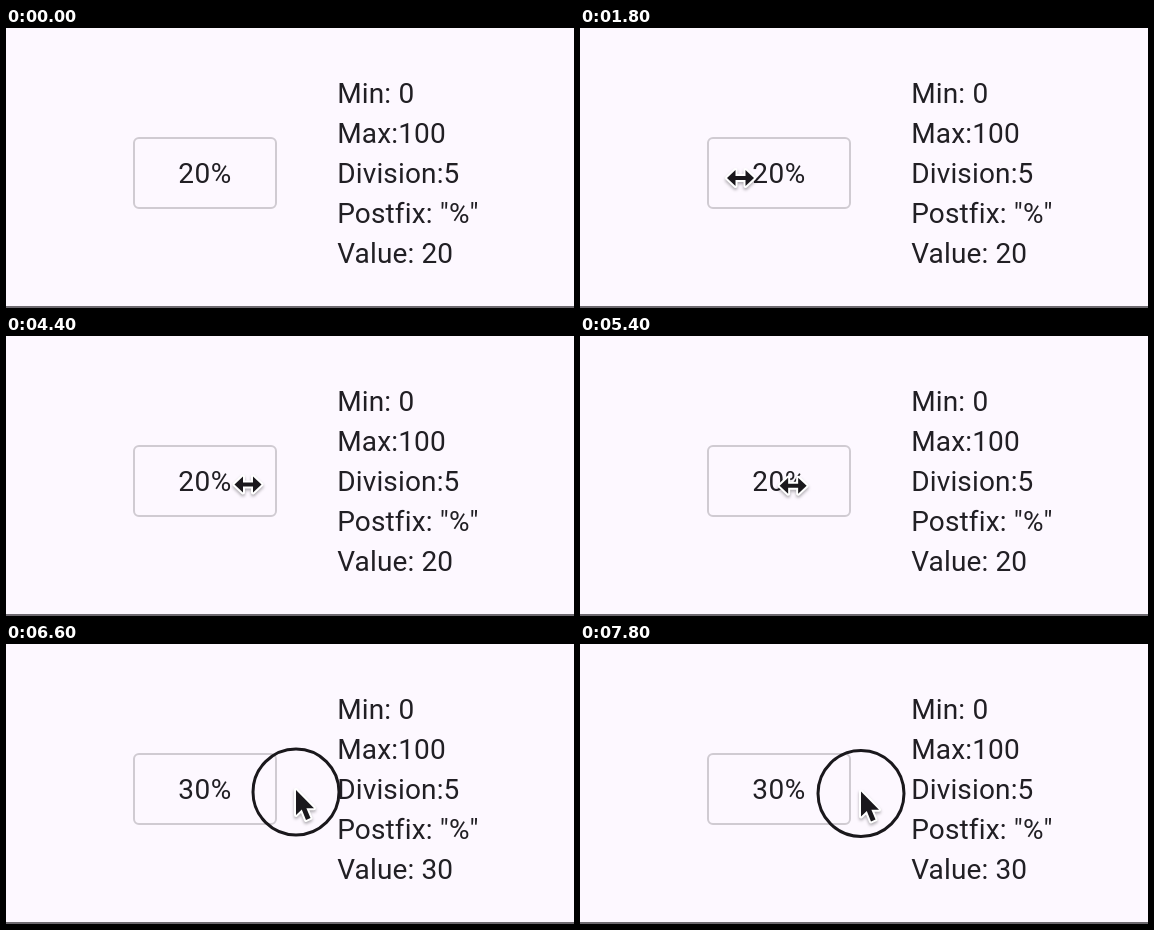
An HTML page that plays this animation: 568x280 px, repeating every 8000 ms.

```html
<!DOCTYPE html>
<html lang="en">
<head>
<meta charset="utf-8">
<title>Drag to change value</title>
<style>
  html, body { margin: 0; width: 100%; height: 100%; overflow: hidden; background: #fdf8ff; }
  svg { display: block; width: 568px; height: 280px; }
  text { font: 28px Roboto, sans-serif; letter-spacing: .5px; fill: #211f24; }
  .info text { letter-spacing: .15px; }
  .cursor path {
    fill: #1a181c; stroke: #fff; stroke-width: 4; stroke-linejoin: round; paint-order: stroke;
    filter: drop-shadow(0 2px 1.5px rgba(0, 0, 0, .3));
  }
</style>
</head>
<body>
<svg viewBox="0 0 568 280">
  <rect y="278" width="568" height="2" fill="#6d696f"/>
  <rect x="128" y="110" width="142" height="70" rx="5" fill="none" stroke="#d0cbd2" stroke-width="2"/>
  <text id="field" x="172.25" y="155">20%</text>
  <g class="info">
    <text x="331.2" y="75">Min: 0</text>
    <text x="331.2" y="115">Max:100</text>
    <text x="331.2" y="155">Division:5</text>
    <text x="331.2" y="195">Postfix: "%"</text>
    <text id="label" x="331.2" y="235">Value: 20</text>
  </g>
  <g id="cursor" class="cursor">
    <path id="resize" transform="translate(2 2)"
      d="M-13.5 0L-5-8V-2H5V-8L13.5 0L5 8V2H-5V8Z"/>
    <path id="pointer" transform="translate(0 -2)"
      d="M0 0V25L5.8 19.6L10 30L14.5 28L10.4 18.2H18Z"/>
    <circle id="ring" fill="none" stroke="#1a181c" stroke-width="3"/>
  </g>
</svg>
<script>
  const LOOP = 8000, STEP = 200, ENTER = 800, PRESS = 5800;
  const DIVISION = 5, PIXELS_PER_DIVISION = 36;

  // Where the mouse turns or rests; it eases from one stop to the next
  const stops = [
    { t: ENTER, x: 334, y: 249 },
    { t: 1200, x: 226, y: 148 },
    { t: 2400, x: 91, y: 148 },
    { t: 3200, x: 223, y: 145.5 },
    { t: 4400, x: 240, y: 146.5 },
    { t: PRESS, x: 204, y: 148 },
    { t: 6600, x: 290, y: 148 },
    { t: 7800, x: 281, y: 149.5 }
  ];

  const $ = id => document.getElementById(id);
  const show = (id, on) => $(id).setAttribute('visibility', on ? 'visible' : 'hidden');
  const ease = k => k * k * (3 - 2 * k);

  function mouseAt(t) {
    const next = stops.findIndex(stop => stop.t > t);
    if (next < 1) return stops.at(next);
    const a = stops[next - 1], b = stops[next];
    const k = ease((t - a.t) / (b.t - a.t));
    return { x: a.x + (b.x - a.x) * k, y: a.y + (b.y - a.y) * k };
  }

  function draw(t) {
    const visible = t >= ENTER, pressed = t >= PRESS;
    const { x, y } = mouseAt(t);
    const dragged = pressed ? x - mouseAt(PRESS).x : 0;
    const value = 20 + DIVISION * Math.floor(dragged / PIXELS_PER_DIVISION);
    $('field').textContent = value + '%';
    $('label').textContent = 'Value: ' + value;

    const inside = Math.abs(x - 199) < 72 && Math.abs(y - 145) < 36;
    $('cursor').setAttribute('transform', `translate(${x} ${y})`);
    show('resize', visible && inside);
    show('pointer', visible && !inside);

    // The ring dips briefly when the button goes down
    const dip = pressed ? Math.sin(Math.PI * Math.min((t - PRESS) / 400, 1)) : 0;
    show('ring', pressed);
    $('ring').setAttribute('r', 43 - 6 * dip);
  }

  const start = performance.now();
  function tick() {
    const t = (performance.now() - start) % LOOP;
    draw(Math.floor(t / STEP) * STEP);
    requestAnimationFrame(tick);
  }
  tick();
</script>
</body>
</html>
```
